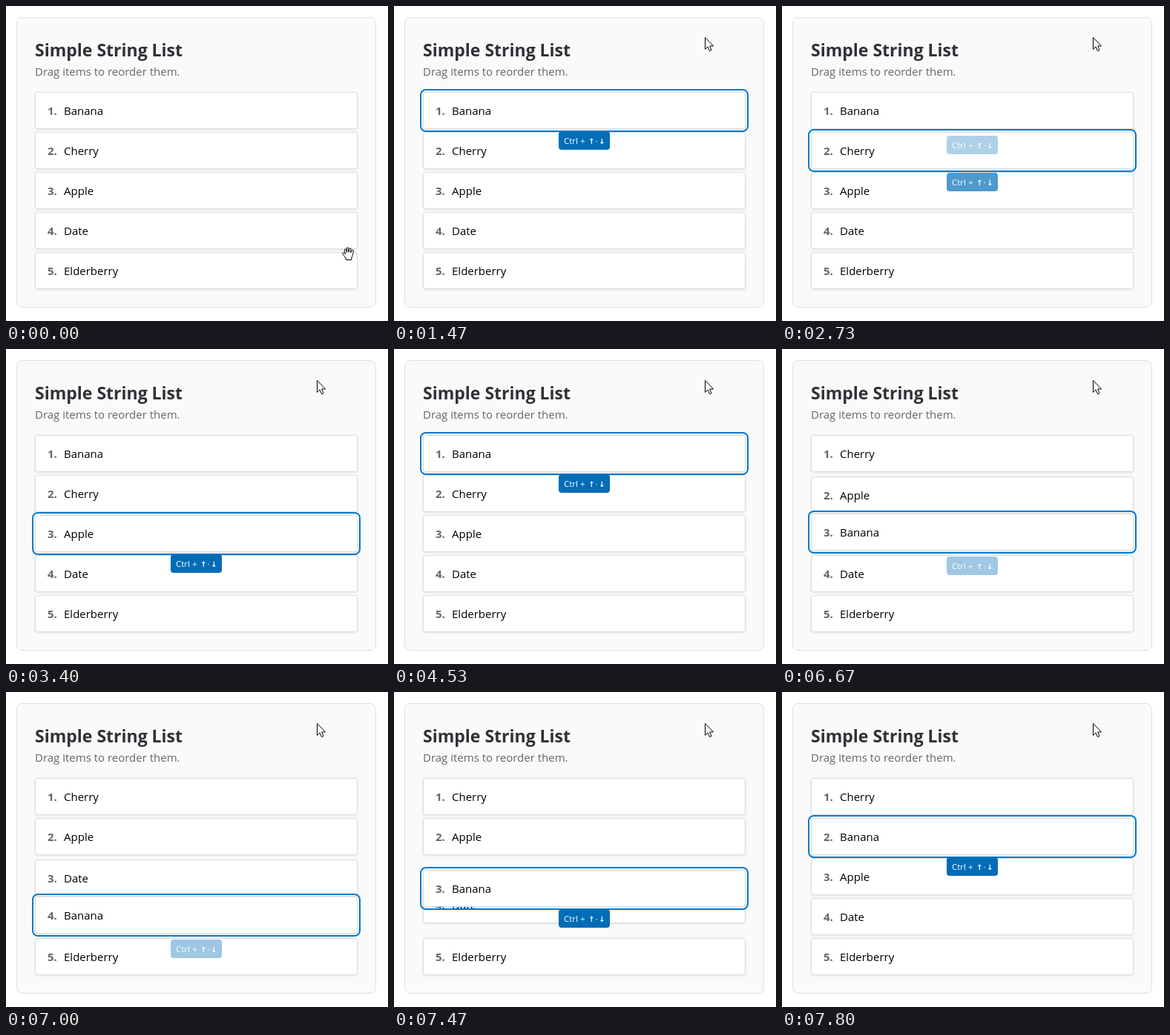
Write an HTML page that moves like this. It is 515 px wide and 425 px high and loops after 8 s.

```html
<!DOCTYPE html>
<html lang="en">
<head>
<meta charset="utf-8">
<title>Simple String List</title>
<style>
  html, body { margin: 0; width: 100%; height: 100%; overflow: hidden; background: #fff; }
  body { position: relative; font: 15px/20px "Open Sans", sans-serif; color: #000; }
  div, h1, p, svg { position: absolute; box-sizing: border-box; margin: 0; white-space: nowrap; }
  .card { left: 14px; top: 15px; width: 485px; height: 392px; background: #fafafa; border: 1px solid #e0e0e0; border-radius: 8px; }
  h1 { left: 39px; top: 44px; font-size: 23px; line-height: 30px; font-weight: 700; color: #303036; }
  p { left: 39px; top: 78px; color: #666; }
  .item { left: 39px; width: 435px; height: 50px; background: #fff; border: 1px solid #ddd; border-radius: 4px; box-shadow: 0 1px 3px rgba(0, 0, 0, .1); }
  .item b, .item span { position: absolute; top: 14px; left: 16px; color: #666; }
  .item span { left: 38px; color: #000; }
  .focused { z-index: 1; outline: 2px solid #007acc; outline-offset: 2px; }
  .tip { z-index: 2; left: 182px; width: 69px; height: 25px; background: #006db7; border-radius: 4px; }
  .tip svg { left: 0; top: 0; }
  .tip text { font: 11.5px "Open Sans", sans-serif; fill: #fff; }
  .tip .arrow { font: bold 10px "DejaVu Sans", sans-serif; }
  .cursor { z-index: 3; left: 0; top: 0; fill: #fff; stroke: #000; stroke-linejoin: round; }
</style>
</head>
<body>
<div class="card"></div>
<h1>Simple String List</h1>
<p>Drag items to reorder them.</p>
<svg class="cursor" width="515" height="425">
  <path id="hand" d="M5.5 17.5L5 15C3.5 13 2 11 .8 9.6C-.2 8 1.8 7 3 8.3L4.5 9.8L3.3 4.5C3 2.7 5 2.3 5.5 4L6.6 7.5L6.5 2C6.5 .2 8.6 .2 8.7 2L9 7.3L10 2.6C10.4 1 12.4 1.4 12.1 3.2L11.6 7.8L13.4 5C14.3 3.6 16 4.5 15.4 6C14.4 9 14.6 10 13.8 12.5L12.8 15V17.5Z"/>
  <path id="arrow" d="M.5 .5V16.5L4 13L6.5 18.7L9 17.6L6.6 12H11.5Z"/>
</svg>
<script>
const LOOP = 8000, RATE = 15 / 1000, ROW = 54, TOP = 116;
const MOVE_MS = 150, FADE_MS = 210, REFOCUS_MS = 56;

// Focus changes: [time, item]
const focusEvents = [[1280, 0], [2640, 1], [3123, 2], [3970, 1], [4300, 0]];
// Item 0 trades places with a neighbour: [time, neighbour, direction]
const swaps = [[6240, 1, 1], [6567, 2, 1], [6900, 3, 1], [7417, 3, -1], [7670, 2, -1]];
// Moving down re-inserts the item, so its tip fades in again
const tipEvents = focusEvents.concat(
  swaps.filter(s => s[2] > 0).map(([time]) => [time, 0, REFOCUS_MS]));

const clamp = x => Math.min(1, Math.max(0, x));
const easeOut = (x, power) => 1 - (1 - clamp(x)) ** power;
const bezier = (u, a, b, c) => a * (1 - u) ** 2 + 2 * b * u * (1 - u) + c * u * u;

const items = ['Banana', 'Cherry', 'Apple', 'Date', 'Elderberry'].map(name => {
  const box = document.createElement('div');
  box.className = 'item';
  box.innerHTML = `<b></b><span>${name}</span><div class="tip"><svg width="69" height="25">
    <text x="7" y="17">Ctrl +</text><text class="arrow" x="40" y="16.5">↑</text>
    <text x="49.5" y="17">·</text><text class="arrow" x="54" y="16.5">↓</text></svg></div>`;
  document.body.append(box);
  return { box, number: box.querySelector('b'), tip: box.querySelector('.tip') };
});
const hand = document.getElementById('hand');
const arrow = document.getElementById('arrow');

function drawList(t) {
  const rank = [0, 1, 2, 3, 4], slot = [0, 1, 2, 3, 4];
  for (const [time, other, dir] of swaps) {
    if (t < time) break;
    const shift = dir * easeOut((t - time) / MOVE_MS, 3);
    slot[0] += shift;
    slot[other] -= shift;
    rank[0] += dir;
    rank[other] -= dir;
  }

  const past = tipEvents.filter(e => e[0] <= t);
  const [now, before] = past.reverse();
  const fade = now ? easeOut((t - now[0] - (now[2] || 0)) / FADE_MS, 2) : 0;

  items.forEach(({ box, number, tip }, i) => {
    const focused = !!now && now[1] === i;
    const leaving = !focused && !!before && before[1] === i;
    const shown = focused ? fade : leaving ? 1 - fade : 0;
    box.style.top = Math.round(TOP + ROW * slot[i]) + 'px';
    box.classList.toggle('focused', focused);
    number.textContent = rank[i] + 1 + '.';
    tip.style.opacity = shown;
    tip.style.top = Math.round(52 + 8 * (1 - shown)) + 'px';
  });
}

function drawCursor(t) {
  const x = clamp(t / 667), u = x * x * (3 - 2 * x);
  const px = Math.round(bezier(u, 461, 200, 419));
  const py = Math.round(bezier(u, 334, 190, 42));
  const overList = py >= TOP;
  hand.style.display = overList ? '' : 'none';
  arrow.style.display = overList ? 'none' : '';
  hand.setAttribute('transform', `translate(${px - 8} ${py - 9})`);
  arrow.setAttribute('transform', `translate(${px} ${py})`);
}

function frame() {
  const t = Math.floor((performance.now() % LOOP + 4) * RATE) / RATE;
  drawList(t);
  drawCursor(t);
  requestAnimationFrame(frame);
}
frame();
</script>
</body>
</html>
```
